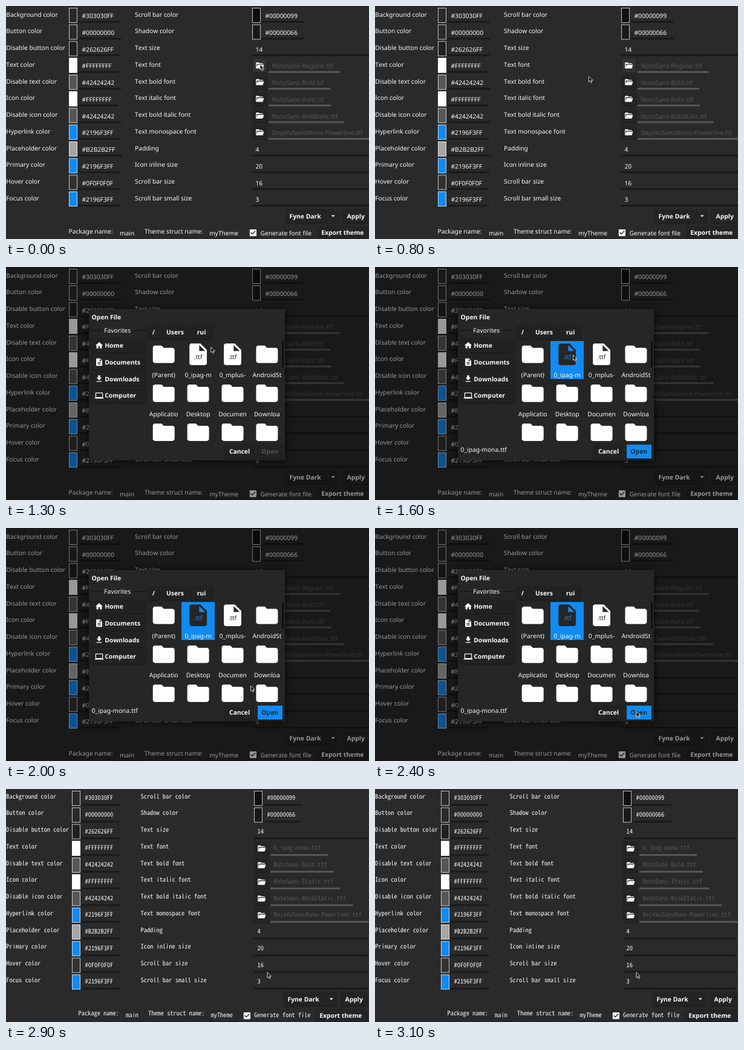
These frames come from a looping animation (600 by 387 pixels, 4 s). An HTML page with a canvas:

```html
<!DOCTYPE html>
<html lang="en">
<head>
<meta charset="utf-8">
<title>Theme editor</title>
<style>
html, body { margin: 0; width: 100%; height: 100%; overflow: hidden; background: #2a2a2a; }
canvas { display: block; width: 600px; height: 387px; }
</style>
</head>
<body>
<canvas id="stage"></canvas>
<script>
const W = 600, H = 387, LOOP = 4000, STEP = 100;
const OPEN_AT = 900, SELECT_AT = 1500, APPLY_AT = 2900;
const BG = '#2a2a2a', PANEL = '#262626', BLUE = '#118af2', WHITE = '#fafafa';
const DISABLED = '#575757', HOVER = '#323232';
const PITCH = 27.75;

const canvas = document.getElementById('stage');
const ctx = canvas.getContext('2d');
const dpr = window.devicePixelRatio || 1;
canvas.width = W * dpr;
canvas.height = H * dpr;

const SANS_FAMILY = '"Noto Sans", "Open Sans", sans-serif';
const MONO_FAMILY = '"Noto Sans Mono CJK JP", "Noto Sans Mono", "Liberation Mono", monospace';
const SANS = '10.25px ' + SANS_FAMILY;
const BOLD = 'bold 10.35px ' + SANS_FAMILY;

// Choose the size at which one column is 5.2px wide.
function monoFont() {
  ctx.font = '100px ' + MONO_FAMILY;
  return (520 / ctx.measureText('0').width).toFixed(2) + 'px ' + MONO_FAMILY;
}
const MONO = monoFont();

const ICONS = {
  folder: 'M10 4H4c-1.1 0-1.99.9-1.99 2L2 18c0 1.1.9 2 2 2h16c1.1 0 2-.9 2-2V8c0-1.1-.9-2-2-2h-8l-2-2z',
  open: 'M19 20H4c-1.1 0-2-.9-2-2V6c0-1.1.9-2 2-2h6l2 2h7c1.1 0 2 .9 2 2H4v10l2.1-8h17.1l-2.3 8.5c-.2.9-1 1.5-1.9 1.5z',
  file: 'M6 2c-1.1 0-1.99.9-1.99 2L4 20c0 1.1.89 2 1.99 2H18c1.1 0 2-.9 2-2V8l-6-6H6zm7 7V3.5L18.5 9H13z',
  home: 'M10 20v-6h4v6h5v-8h3L12 3 2 12h3v8z',
  doc: 'M14 2H6c-1.1 0-1.99.9-1.99 2L4 20c0 1.1.89 2 1.99 2H18c1.1 0 2-.9 2-2V8l-6-6zm2 16H8v-2h8v2zm0-4H8v-2h8v2zm-3-5V3.5L18.5 9H13z',
  download: 'M19 9h-4V3H9v6H5l7 7 7-7zM5 18v2h14v-2H5z',
  computer: 'M20 18c1.1 0 1.99-.9 1.99-2L22 6c0-1.1-.9-2-2-2H4c-1.1 0-2 .9-2 2v10c0 1.1.9 2 2 2H0v2h24v-2h-4zM4 6h16v10H4V6z',
  check: 'M19 3H5c-1.11 0-2 .9-2 2v14c0 1.1.89 2 2 2h14c1.11 0 2-.9 2-2V5c0-1.1-.89-2-2-2zm-9 14l-5-5 1.41-1.41L10 14.17l7.59-7.59L19 8l-9 9z',
  down: 'M7 9.5l5 5 5-5z'
};
for (const key in ICONS) ICONS[key] = new Path2D(ICONS[key]);
const ARROW = new Path2D('M0 0V10.2L2.4 8.1 4 11.8 5.8 11 4.2 7.4H7.4Z');

const COLORS = [
  ['Background color', '#303030FF', BG],
  ['Button color', '#00000000', BG],
  ['Disable button color', '#262626FF', '#212121'],
  ['Text color', '#FFFFFFFF', '#ffffff'],
  ['Disable text color', '#42424242', DISABLED],
  ['Icon color', '#FFFFFFFF', '#ffffff'],
  ['Disable icon color', '#42424242', DISABLED],
  ['Hyperlink color', '#2196F3FF', BLUE],
  ['Placeholder color', '#B2B2B2FF', '#a6a6a6'],
  ['Primary color', '#2196F3FF', BLUE],
  ['Hover color', '#0F0F0F0F', HOVER],
  ['Focus color', '#2196F3FF', BLUE]
];
const SETTINGS = [
  ['Scroll bar color', '#00000099', '#0f0f0f'],
  ['Shadow color', '#00000066', '#191919'],
  ['Text size', '14'],
  ['Text font', 'NotoSans-Regular.ttf'],
  ['Text bold font', 'NotoSans-Bold.ttf'],
  ['Text italic font', 'NotoSans-Italic.ttf'],
  ['Text bold italic font', 'NotoSans-BoldItalic.ttf'],
  ['Text monospace font', 'DejaVuSansMono-Powerline.ttf'],
  ['Padding', '4'],
  ['Icon inline size', '20'],
  ['Scroll bar size', '16'],
  ['Scroll bar small size', '3']
];
const FONT_ROW = 3;

// Horizontal layout before and after the new font is loaded; lift raises the text.
const BEFORE = {
  font: SANS, lift: 0, swatch: 104, label: 213, field: 407, edge: 600, file: 'NotoSans-Regular.ttf',
  hover: true, theme: 463, pkg: 103.5, main: 188, struct: 229, name: 336, check: 408.4, gen: 420.5
};
const AFTER = {
  font: MONO, lift: 2, swatch: 109, label: 222.5, field: 410, edge: 597, file: '0_ipag-mona.ttf',
  hover: false, theme: 460, pkg: 119.5, main: 198, struct: 235, name: 338.5, check: 398.4, gen: 410
};

function rect(x, y, w, h, color) {
  ctx.fillStyle = color;
  ctx.fillRect(x, y, w, h);
}

function text(str, x, y, font = SANS, color = WHITE, align = 'left') {
  ctx.font = font;
  ctx.fillStyle = color;
  ctx.textAlign = align;
  ctx.fillText(str, x, y);
}

function width(str, font) {
  ctx.font = font;
  return ctx.measureText(str).width;
}

function icon(name, cx, cy, scale = 0.625, color = WHITE) {
  ctx.save();
  ctx.translate(cx - 12 * scale, cy - 12 * scale);
  ctx.scale(scale, scale);
  ctx.fillStyle = color;
  ctx.fill(ICONS[name]);
  ctx.restore();
}

function raised(x, y, w, h, color, blur, alpha) {
  ctx.save();
  ctx.shadowColor = `rgba(0,0,0,${alpha})`;
  ctx.shadowBlur = blur * dpr;
  ctx.shadowOffsetY = dpr;
  rect(x, y, w, h, color);
  ctx.restore();
}

function button(x, y, w, h, color = '#242424') {
  raised(x, y, w, h, color, 3, 0.45);
}

function swatch(x, y, color) {
  rect(x, y, 14, 24.75, color);
  ctx.strokeStyle = WHITE;
  ctx.lineWidth = 0.75;
  ctx.strokeRect(x + 0.4, y + 0.4, 13.2, 24);
}

// Entry text with its underline; the line fits the text unless an end is given.
function entry(str, x, row, lay, color, line, end) {
  const base = Math.round(20.1 + PITCH * row) - lay.lift;
  const right = end || x + 16.8 + width(str, lay.font);
  rect(x, 24.9 + PITCH * row, right - x, 3, line);
  text(str, x + 5.5, base, lay.font, color);
}

function drawForm(lay) {
  rect(0, 0, W, H, BG);
  const line = '#1a1a1a';
  const top = row => 3 + PITCH * row;
  const labelY = row => Math.round(17.6 + PITCH * row) - lay.lift;

  COLORS.forEach(([label, hex, color], row) => {
    text(label, 0.3, labelY(row), lay.font);
    swatch(lay.swatch, top(row), color);
    entry(hex, lay.swatch + 16, row, lay, WHITE, line);
  });

  SETTINGS.forEach(([label, value, color], row) => {
    text(label, lay.label, labelY(row), lay.font);
    if (color) {
      swatch(lay.field, top(row), color);
      entry(value, lay.field + 16, row, lay, WHITE, line);
    } else if (value.endsWith('.ttf')) {
      const chosen = row === FONT_ROW;
      button(lay.field + 1, top(row) + 1, 23, 23, chosen && lay.hover ? HOVER : undefined);
      icon('open', lay.field + 12.3, top(row) + 12.4);
      entry(chosen ? lay.file : value, lay.field + 27, row, lay, DISABLED, DISABLED);
    } else {
      entry(value, lay.field, row, lay, WHITE, line, lay.edge);
    }
  });

  const { theme, edge } = lay;
  button(theme, 338, 86, 22);
  text('Fyne Dark', theme + 5.5, 353, BOLD);
  icon('down', theme + 77.7, 349);
  button(edge - 43, 338, 43, 22);
  text('Apply', edge - 36.5, 353, BOLD);
  button(edge - 84, 365.5, 84, 22);
  text('Export theme', edge - 78.8, 380, BOLD);

  text('Package name:', lay.pkg, 378 - lay.lift, lay.font);
  text('Theme struct name:', lay.struct, 378 - lay.lift, lay.font);
  for (const [str, x] of [['main', lay.main], ['myTheme', lay.name]]) {
    rect(x - 6, 386, width(str, lay.font) + 16, 1, line);
    text(str, x, 381 - lay.lift, lay.font);
  }
  icon('check', lay.check, 376.5);
  text('Generate font file', lay.gen, 381 - lay.lift, lay.font);
}

const FAVORITES = [['home', 'Home'], ['doc', 'Documents'], ['download', 'Downloads'], ['computer', 'Computer']];
const CRUMBS = [['/', 235, 18], ['Users', 258, 43], ['rui', 306, 34]];
const FILES = [
  '(Parent)', '0_ipag-m', '0_mplus-', 'AndroidSt',
  'Applicatio', 'Desktop', 'Documen', 'Downloa', '', '', '', ''
];

function drawFiles(selected) {
  ctx.save();
  ctx.beginPath();
  ctx.rect(234, 122, 225, 169);
  ctx.clip();
  FILES.forEach((name, i) => {
    const cx = 260.7 + 56.9 * (i % 4);
    const row = Math.floor(i / 4);
    const cy = 145 + 64.75 * row;
    const isFile = i === 1 || i === 2;
    const active = selected && i === 1;
    if (active) rect(290, 123, 55, 63, BLUE);
    icon(isFile ? 'file' : 'folder', cx, cy, 1.8, active ? PANEL : '#ffffff');
    if (isFile) text('.ttf', cx, 153, SANS, active ? BLUE : PANEL, 'center');
    text(name, cx, Math.round(183.3 + 64.5 * row), SANS, WHITE, 'center');
  });
  rect(456, 123, 3, 44, '#101010');
  ctx.restore();
}

function drawDialog(selected) {
  rect(0, 0, W, H, 'rgba(0,0,0,0.4)');
  raised(137, 70, 324, 251, PANEL, 12, 0.7);
  text('Open File', 141.6, 87, BOLD);

  rect(140, 105, 18, 1, '#111');
  rect(211, 105, 20, 1, '#111');
  text('Favorites', 162.3, 109);
  FAVORITES.forEach(([name, label], i) => {
    const cy = 130.3 + 27.7 * i;
    button(141, Math.round(cy - 11.5), 89, 23, '#222');
    icon(name, 154, cy);
    text(label, 163.2, Math.round(cy + 3.8), BOLD);
  });

  for (const [label, x, w] of CRUMBS) {
    button(x, 97, w, 22, '#222');
    text(label, x + w / 2, 112, BOLD, WHITE, 'center');
  }
  drawFiles(selected);

  if (selected) text('0_ipag-mona.ttf', 141.6, 307);
  button(363, 295, 46, 23, '#222');
  text('Cancel', 386, 310, BOLD, WHITE, 'center');
  button(416, 295, 41, 23, selected ? BLUE : '#222');
  text('Open', 436.2, 310, BOLD, selected ? PANEL : DISABLED, 'center');
}

// Pointer stops: time, x, y.
const TRACK = [
  [0, 420, 97], [100, 416, 98], [500, 353.5, 117], [1100, 353.5, 117], [1200, 350, 120],
  [1400, 327.5, 146], [1800, 327.5, 146], [2000, 404.5, 262], [2300, 432, 305], [2900, 432, 304.5]
];

function pointer(t) {
  const next = TRACK.findIndex(p => p[0] > t);
  if (next < 0) return TRACK[TRACK.length - 1].slice(1);
  const [t0, x0, y0] = TRACK[next - 1];
  const [t1, x1, y1] = TRACK[next];
  const k = (t - t0) / (t1 - t0);
  return [x0 + (x1 - x0) * k, y0 + (y1 - y0) * k];
}

function drawPointer(t) {
  const [x, y] = pointer(t);
  ctx.save();
  ctx.translate(x, y);
  ctx.scale(0.88, 0.88);
  ctx.lineWidth = 1;
  ctx.strokeStyle = '#f2f2f2';
  ctx.fillStyle = '#000';
  ctx.fill(ARROW);
  ctx.stroke(ARROW);
  ctx.restore();
}

function draw(t) {
  ctx.setTransform(dpr, 0, 0, dpr, 0, 0);
  ctx.fontKerning = 'none';
  ctx.textRendering = 'geometricPrecision';
  drawForm(t < APPLY_AT ? BEFORE : AFTER);
  if (t >= OPEN_AT && t < APPLY_AT) drawDialog(t >= SELECT_AT);
  drawPointer(t);
}

const start = performance.now();
function tick() {
  const t = (performance.now() - start) % LOOP;
  draw(Math.floor(t / STEP) * STEP);
  requestAnimationFrame(tick);
}
tick();
</script>
</body>
</html>
```
